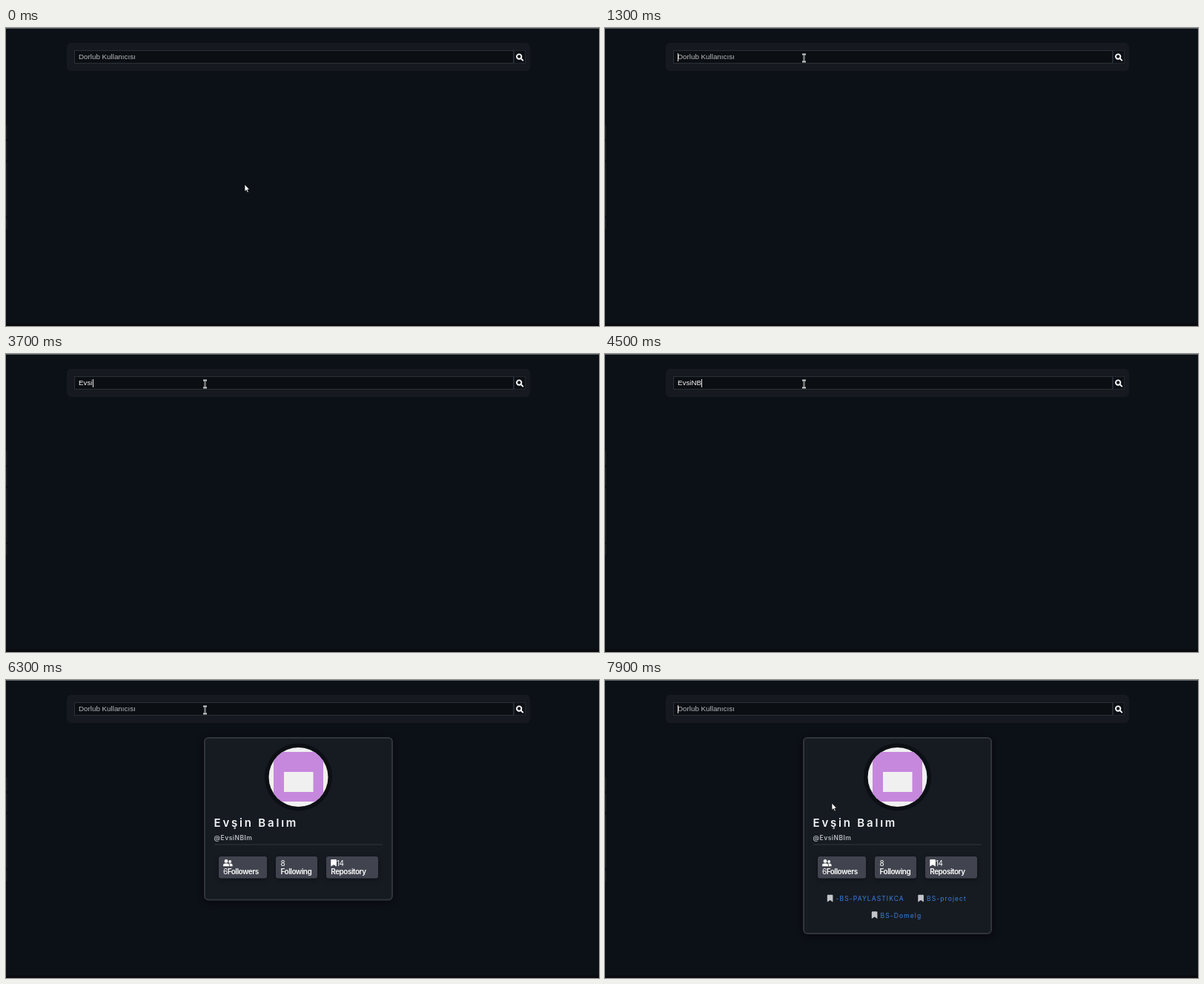
Recreate the animation shown at these times as an HTML page. Size 800 by 402 pixels, loop 8000 ms.

```html
<!DOCTYPE html>
<html lang="tr">
<head>
<meta charset="utf-8">
<title>Kullanıcı arama</title>
<style>
  html, body { margin: 0; width: 100%; height: 100%; overflow: hidden; background: #0c1017; }
  svg { display: block; width: 100vw; height: 100vh; }
  text { font-family: Inter, "Open Sans", sans-serif; white-space: pre; }
  .field { font: 9.8px "Liberation Sans", Arial, sans-serif; }
  .name { font-size: 15px; font-weight: 600; letter-spacing: 2.8px; fill: #f4f5f7; }
  .user { font-size: 8.5px; font-weight: 600; letter-spacing: .5px; fill: #b9bcc2; }
  .stat { font-size: 10px; letter-spacing: -.5px; fill: #fff; }
  .stat .b { font-weight: 600; }
  .repo { font-size: 8.5px; letter-spacing: 1.1px; fill: #3a80e4; }
  .marks { fill: #c3c5c9; }
  .badge rect { fill: #41444e; filter: drop-shadow(0 2px 3px #0006); }
  #panel { fill: #161b22; stroke: #30343b; stroke-width: 2; filter: drop-shadow(0 2px 5px #0007); }
</style>
</head>
<body>
<svg viewBox="0 0 800 402" preserveAspectRatio="none">
  <defs>
    <path id="mark" d="M1 0H6.6Q7.6 0 7.6 1V9.6L3.8 7.2L0 9.6V1Q0 0 1 0Z"/>
    <clipPath id="round"><circle cx="394.5" cy="131" r="40"/></clipPath>
  </defs>

  <rect width="800" height="402" fill="#0c1017"/>
  <rect width="800" height="1" fill="#5d6167"/>
  <rect y="398.5" width="800" height="3.5" fill="#090b0e"/>
  <path d="M.75 131V150M.75 153V178M.75 181V254M.75 257V271" stroke="#1d2127" stroke-width="1.5"/>

  <rect x="82" y="20" width="625" height="38" rx="6" fill="#161a20"/>
  <rect x="92.5" y="30.5" width="592" height="17" fill="#0b0e12" stroke="#2b3037"/>
  <rect x="685.5" y="30.5" width="15" height="17" fill="#0d1116" stroke="#22272e"/>
  <g fill="none" stroke="#fff" stroke-width="1.9">
    <circle cx="692.2" cy="38.6" r="3.2"/>
    <path d="M694.6 41L697.3 43.7" stroke-linecap="round"/>
  </g>
  <text id="hint" class="field" x="98" y="42" fill="#b9bbbe">Dorlub Kullanıcısı</text>
  <text id="typed" class="field" x="98" y="42" fill="#f5f5f5"></text>
  <rect id="caret" y="34" width="1" height="11" fill="#e6e6e6"/>

  <g id="card">
    <rect id="panel" x="268" y="78" width="253" height="218.5" rx="5"/>
    <circle cx="394.5" cy="131" r="45.5" fill="#0c1015"/>
    <g clip-path="url(#round)">
      <rect x="354" y="91" width="81" height="81" fill="#f0f0f0"/>
      <rect x="361" y="97" width="67" height="67" fill="#c688dc"/>
      <rect x="375" y="124" width="39.5" height="27" fill="#f0f0f0"/>
    </g>
    <text class="name" x="280.5" y="198">Evşin Balım</text>
    <text class="user" x="280.5" y="215.5">@EvsiNBlm</text>
    <rect x="281" y="221.5" width="227" height="1" fill="#30353c"/>

    <g class="badge">
      <rect x="287" y="238" width="65" height="29.5" rx="3"/>
      <rect x="364" y="238" width="56" height="29.5" rx="3"/>
      <rect x="432" y="238" width="70" height="29.5" rx="3"/>
    </g>
    <g fill="#fff">
      <circle cx="297" cy="244.4" r="2.4"/>
      <path d="M293 251.3V250Q293 247.4 295.6 247.4H298.4Q301 247.4 301 250V251.3Z"/>
      <circle cx="302.2" cy="244.9" r="1.9"/>
      <path d="M301.8 251.3V249.6Q301.8 248.2 300.9 247.4H303Q305.6 247.4 305.6 250V251.3Z"/>
      <use href="#mark" x="438.3" y="242"/>
    </g>
    <g class="stat">
      <text x="293" y="262">6<tspan class="b">Followers</tspan></text>
      <text x="370.5" y="250.5">8</text>
      <text class="b" x="370.5" y="262">Following</text>
      <text x="446" y="250.5">14</text>
      <text class="b" x="438.3" y="262">Repository</text>
    </g>

    <g id="repos">
      <g class="marks">
        <use href="#mark" x="299.8" y="289.8"/>
        <use href="#mark" x="422.3" y="289.8"/>
        <use href="#mark" x="359.8" y="312.3"/>
      </g>
      <g class="repo">
        <text x="311.5" y="298">-BS-PAYLASTIKCA</text>
        <text x="434" y="298">BS-project</text>
        <text x="371.5" y="320.5">BS-Domelg</text>
      </g>
    </g>
  </g>

  <g id="pointer">
    <path id="arrow" d="M0 0V9.6L2.2 7.6L3.7 11L5.3 10.3L3.8 7H6.6Z" fill="#fff" stroke="#08090b" stroke-width=".7"/>
    <g id="beam" fill="none">
      <path d="M-2.5 -5H2.5M0 -5V5M-2.5 5H2.5" stroke="#cfcfcf" stroke-width="1.8"/>
      <path d="M0 -4.6V4.6" stroke="#4b4b4b" stroke-width=".6"/>
    </g>
  </g>
</svg>
<script>
  const LOOP = 8000, TICK = 100;
  const WORD = "EvsiNBlm";
  const KEYS = [2700, 3200, 3400, 3700, 4200, 4500, 5100, 5300];
  const ENTER = 6200, CARD = 6300, REPOS = 6600;
  const CARET = [[1100, 1600], [2200, 5900], [6400, 6900], [7400, 8000]];
  const START = [322, 211], FIELD = [268.5, 40.5], END = [306, 166];

  const $ = id => document.getElementById(id);
  const show = (id, on) => $(id).setAttribute("visibility", on ? "inherit" : "hidden");
  const ease = p => p * p * (3 - 2 * p);
  const glide = (a, b, t, from, to) => {
    const p = ease(Math.min(1, Math.max(0, (t - from) / (to - from))));
    return a.map((v, i) => v + (b[i] - v) * p);
  };

  function draw(time) {
    const t = Math.floor(time % LOOP / TICK) * TICK;

    const count = t < ENTER ? KEYS.filter(k => k <= t).length : 0;
    const typed = $("typed");
    typed.textContent = WORD.slice(0, count);
    show("hint", !count);
    show("caret", CARET.some(([on, off]) => t >= on && t < off));
    $("caret").setAttribute("x", 98 + (count ? Math.round(typed.getComputedTextLength()) : 0));

    show("card", t >= CARD);
    show("repos", t >= REPOS);
    $("repos").style.display = t >= REPOS ? "" : "none";
    $("panel").setAttribute("height", t >= REPOS ? 264 : 218.5);

    const [x, y] = t < 7000 ? glide(START, FIELD, t, 0, 800) : glide(FIELD, END, t, 7000, 7900);
    const inField = y > 30 && y < 48;
    $("pointer").setAttribute("transform", `translate(${x} ${y})`);
    show("beam", inField);
    show("arrow", !inField);
  }

  const t0 = performance.now();
  function loop() {
    draw(performance.now() - t0);
    requestAnimationFrame(loop);
  }
  loop();
</script>
</body>
</html>
```
